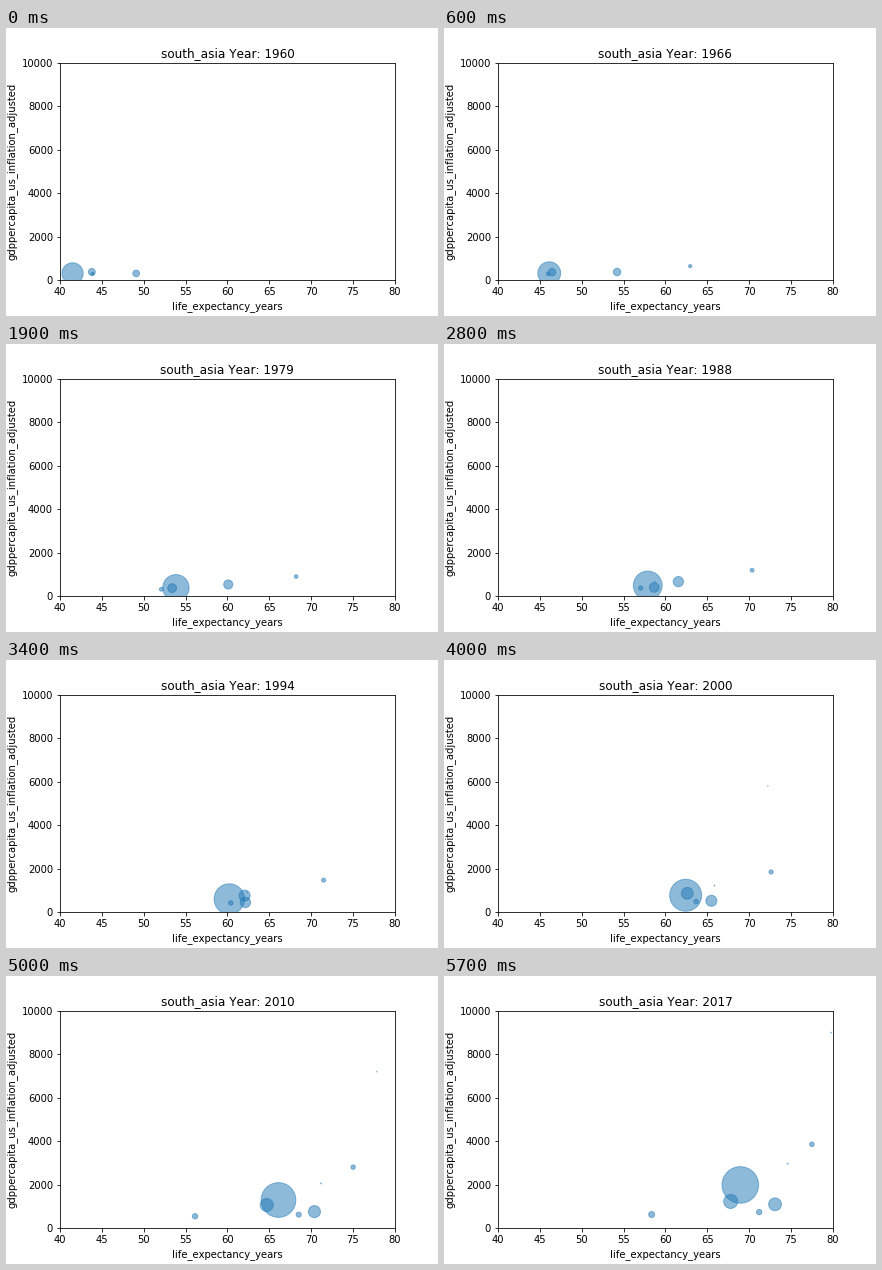
Animation, 432 px wide and 288 px high, one loop 5800 ms. Source, as a matplotlib script:

```python
import matplotlib.pyplot as plt
import numpy as np
from matplotlib.animation import FuncAnimation

FIRST, LAST = 1960, 2017

plt.rcParams["text.kerning_factor"] = 6

# Per country: first year, then life expectancy, income and bubble diameter
# at key points spread evenly from that year to the last one.
COUNTRIES = {
    "Afghanistan": (2002, (52.7, 55.95, 58.35), (360, 530, 620), (4.7, 6)),
    "Bangladesh": (1960, (43.8, 53.4, 64.4, 73.1), (372, 362, 486, 1090), (6.9, 12.8)),
    "Bhutan": (1980, (53.5, 65, 74.6), (450, 1130, 2960), (0.64, 0.9)),
    "India": (1960, (41.5, 53.85, 61.7, 68.95), (304, 380, 705, 1980), (21.2, 36.6)),
    "Maldives": (1995, (68.2, 76, 79.8), (5450, 6500, 8990), (0.5, 0.66)),
    "Nepal": (1960, (43.9, 52.1, 62.6, 71.2), (285, 310, 455, 730), (3.2, 5.4)),
    "Pakistan": (1960, (49.1, 60.1, 62.4, 67.8), (304, 530, 824, 1220), (6.7, 14)),
    "Sri Lanka": (1961, (59.9, 68.4, 72.3, 77.5), (575, 910, 1725, 3850), (3.2, 4.6)),
}


def curve(keys, t):
    """Smooth polynomial through evenly spaced keys, t from 0 to 1."""
    steps = np.linspace(0, 1, len(keys))
    return np.polyval(np.polyfit(steps, keys, len(keys) - 1), t)


def bubbles(year):
    """Rows of life expectancy, income and area for countries with data."""
    rows = []
    for start, life, income, width in COUNTRIES.values():
        if year >= start:
            t = (year - start) / (LAST - start)
            rows.append((curve(life, t), np.exp(curve(np.log(income), t)),
                         curve(width, t) ** 2))
    return np.array(rows)


fig, ax = plt.subplots(figsize=(6, 4), dpi=72)
fig.subplots_adjust(left=0.125, right=0.9, bottom=0.125, top=0.88)
ax.set(xlim=(40, 80), ylim=(0, 10000), xlabel="life_expectancy_years",
       ylabel="gdppercapita_us_inflation_adjusted")
title = ax.set_title("")
dots = ax.scatter([], [], s=[], color="C0", alpha=0.5)


def update(frame):
    year = FIRST + frame
    data = bubbles(year)
    dots.set_offsets(data[:, :2])
    dots.set_sizes(data[:, 2])
    title.set_text(f"south_asia Year: {year}")
    return dots, title


anim = FuncAnimation(fig, update, frames=LAST - FIRST + 1, interval=100,
                     init_func=lambda: update(0), repeat=True, repeat_delay=0)
plt.show()
```
